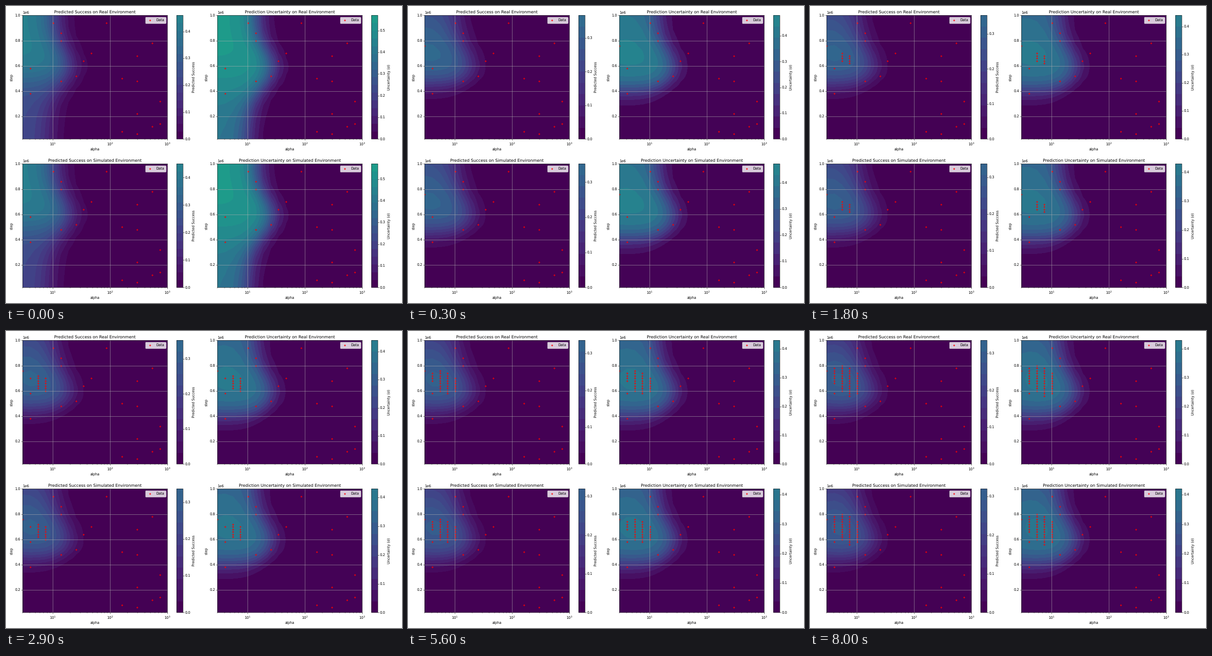
A matplotlib script for the animation above (8100 ms loop, 864x648 px).

```python
import numpy as np
import matplotlib.pyplot as plt
from matplotlib.animation import FuncAnimation
from matplotlib.colors import Normalize

plt.rcParams["text.hinting"] = "none"

W, H, DPI = 864, 648, 54
FRAMES, INTERVAL = 81, 100
SETTLE = 3      # frames until the surface reaches its late form
PEAK = 1.02     # peak height relative to the lower limit of the top band

# Sampling grid: 20 alphas on a log scale, 50 training steps
ALPHAS = np.logspace(np.log10(3), 3, 20)
STEPS = np.linspace(0.02, 1.0, 50)
PX, S = np.meshgrid(36 + np.arange(20) * 316 / 19, STEPS)

# (alpha index, step in 1e4) of the data known at the start
KNOWN = [(4, 94), (5, 86), (5, 80), (11, 94), (9, 70), (8, 64), (7, 52),
         (5, 48), (1, 58), (1, 38), (17, 78), (15, 68), (13, 50), (15, 48),
         (18, 32), (15, 22), (13, 8), (17, 12), (18, 14), (15, 6)]

# alpha index, lowest step, first step, highest step, delay, slowness
COLUMNS = [(1, 66, 70.5, 78, 5.9, 1), (2, 60, 67, 80, 0, 1),
           (3, 56, 65, 78, 0, 1), (4, 58, 64, 74, 8, 0.42)]

# Pairs run from the first fit to the settled one, or from bottom to top (edge)
SUCCESS = dict(label="Predicted Success", floor=0.53, rise=(0.50, 0.46),
               soft=(0.07, 0.055), edge=(90, 101), bulge=36, width=16.5,
               drop=1.0, tau=1.5, late=0.017)
SIGMA = dict(label="Uncertainty (σ)", floor=0.72, rise=(0.42, 0.41),
             soft=(0.11, 0.055), edge=(100, 117), bulge=41, width=14.5,
             drop=0.5, tau=2.5, late=0.01)

# title, model, first and settled top of the colour bar
PANELS = [
    ("Predicted Success on Real Environment", SUCCESS, 0.46, 0.353),
    ("Prediction Uncertainty on Real Environment", SIGMA, 0.57, 0.44),
    ("Predicted Success on Simulated Environment", SUCCESS, 0.45, 0.337),
    ("Prediction Uncertainty on Simulated Environment", SIGMA, 0.57, 0.43),
]


def mix(a, b, t):
    return a + (b - a) * t


def sigmoid(v):
    return 1 / (1 + np.exp(-v))


def sample_times():
    """Samples spread up and, more slowly, down from each column's start."""
    samples = [(1, 0, 76)]
    for k, low, first, high, delay, slow in COLUMNS:
        for s in range(low, high + 1, 2):
            reach = max(s - first, 1.35 * (first - s)) * slow + delay
            samples.append((int(5 + 1.5 * reach + 0.31 * reach ** 2), k, s))
    return samples


SAMPLES = sample_times()


def points(frame):
    rows = KNOWN + [(k, s) for t, k, s in SAMPLES if t <= frame]
    return [(ALPHAS[k], s * 1e4) for k, s in rows]


def fit_frame(frame):
    """The model is refitted every frame at first, later only now and then."""
    return frame if frame < 41 else frame - (frame - 41) % 8


def shape(frame, m):
    """Relative height of the surface, peak at 1."""
    early, late = min(frame / SETTLE, 1), frame / FRAMES
    floor = mix(m["floor"], 0, early)
    rise, soft = mix(*m["rise"], early), mix(*m["soft"], early)
    above = np.maximum(S - 0.67, 0)
    left = np.maximum(70 + 16 * late - PX, 0) / 100

    edge = mix(*m["edge"], S) + m["bulge"] * np.exp(-((S - 0.58) / 0.22) ** 2)
    z = sigmoid((edge - PX) / m["width"])
    z *= mix(floor, 1, sigmoid((S - rise) / soft))
    z *= np.exp(-m["drop"] * ((2.2 * early + 2 * late) * above ** 2
                              + (0.12 * early + 0.24 * late) * left ** 2))
    return z / z.max()


def surface(frame, m, first, settled):
    top = mix(settled, first, np.exp(-frame / m["tau"]))
    if frame > 41:
        top -= m["late"]
    bands = round(mix(16, 11, min(frame / SETTLE, 1)))
    z = shape(frame, m) * top * (1 - 1 / bands) * PEAK
    return z, np.linspace(0, top, bands + 1)


class Panel:
    norm = Normalize(0.015, 1)

    def __init__(self, ax, title, model, *tops):
        self.ax, self.params = ax, (model, *tops)
        ax.set_xscale("log")
        ax.set_xlim(ALPHAS[0], ALPHAS[-1])
        ax.set_ylim(STEPS[0] * 1e6, 1e6)
        self.fill(0)
        self.bar = ax.figure.colorbar(self.cs, ax=ax, label=model["label"],
                                      spacing="proportional",
                                      ticks=np.arange(6) / 10)
        self.dots = ax.scatter(*zip(*points(0)), c="red", marker="+",
                               label="Data")
        ax.set(title=title, xlabel="alpha", ylabel="step")
        ax.xaxis.set_label_coords(0.5, -0.065)
        ax.grid(True)
        ax.legend(loc="upper right")

    def fill(self, frame):
        z, levels = surface(frame, *self.params)
        self.cs = self.ax.contourf(ALPHAS, STEPS * 1e6, z, levels=levels,
                                   cmap="viridis", norm=self.norm, zorder=0.9)

    def refit(self, frame):
        self.cs.remove()
        self.fill(frame)
        self.bar.boundaries = self.cs.levels
        self.bar.values = self.cs.cvalues
        self.bar.update_normal(self.cs)


fig, axes = plt.subplots(2, 2, figsize=(W / DPI, H / DPI), dpi=DPI)
fig.subplots_adjust(left=36.4 / W, right=856.4 / W, wspace=30 / 395,
                    top=1 - 20.4 / H, bottom=1 - 614.4 / H, hspace=54 / 270)
panels = [Panel(ax, *spec) for ax, spec in zip(axes.flat, PANELS)]
shown = {"fit": 0}


def update(frame):
    fit = fit_frame(frame)
    for panel in panels:
        if fit != shown["fit"]:
            panel.refit(fit)
        panel.dots.set_offsets(points(frame))
    shown["fit"] = fit
    return []


anim = FuncAnimation(fig, update, frames=FRAMES, interval=INTERVAL, repeat=True)
plt.show()
```
